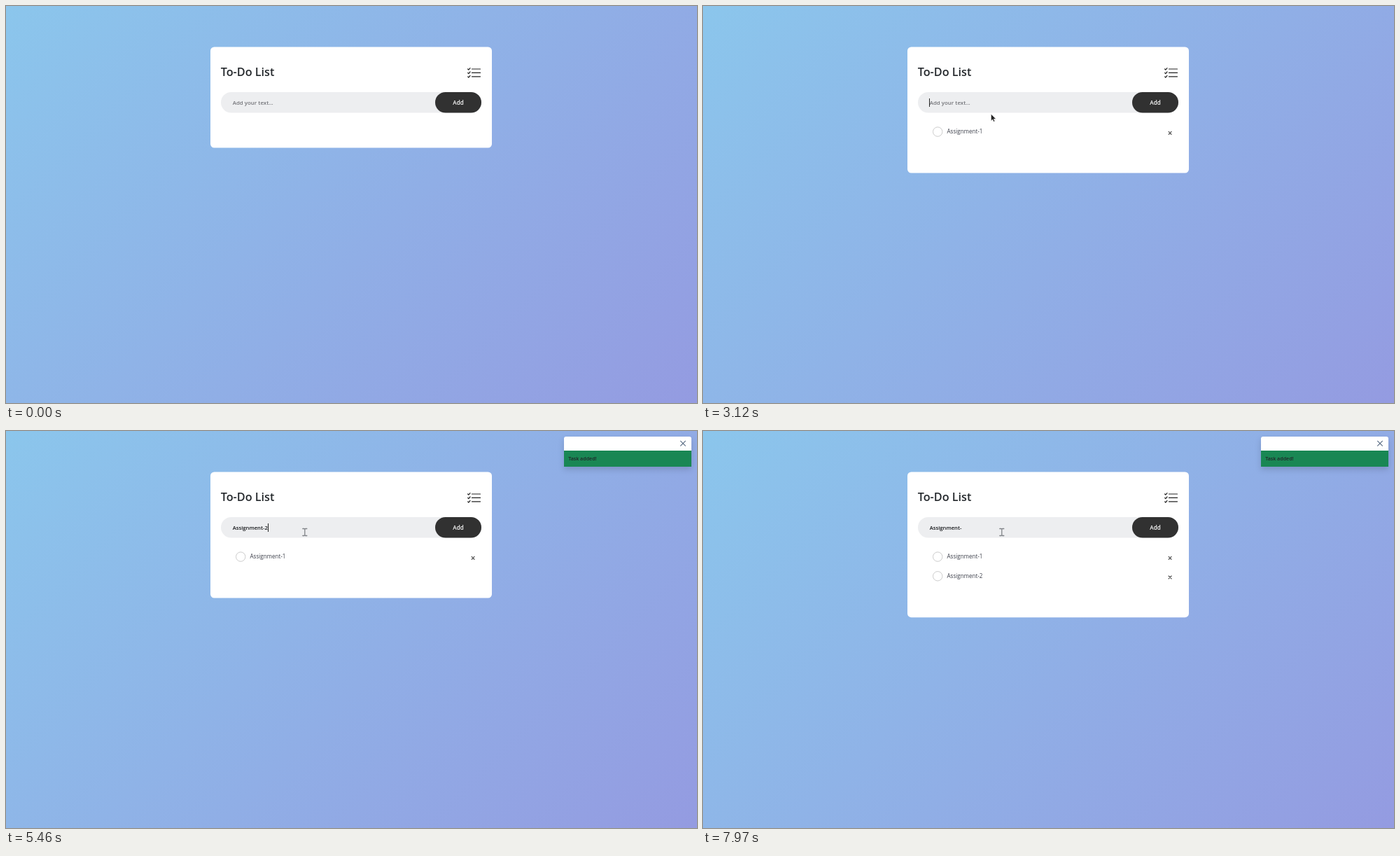
Write an HTML page that moves like this. It is 987 px wide and 567 px high and loops after 8000 ms.

```html
<!DOCTYPE html>
<html lang="en">
<head>
<meta charset="utf-8">
<title>To-Do List</title>
<style>
  html, body { margin: 0; width: 100%; height: 100%; overflow: hidden; }
  body { background: linear-gradient(135deg, #8bc6ec 0%, #949be1 100%); }
  svg { display: block; font-family: "Open Sans", "Noto Sans", sans-serif; }
  .semi { font-weight: 600; }
  .line { fill: none; stroke-linecap: round; stroke-linejoin: round; }
  #toast { filter: drop-shadow(0 4px 4px rgba(0, 0, 0, .15)); }
</style>
</head>
<body>
<svg width="987" height="567" viewBox="0 0 987 567">
  <defs>
    <g id="row">
      <circle cx="335.2" cy="179.6" r="6.7" fill="#fff" stroke="#ccc"/>
      <path class="line" d="M665.1 179.3l4 4m0-4l-4 4" stroke="#444" stroke-width="1.1"/>
    </g>
    <path id="check" class="line" d="M665.5 90h12M659.6 90l1.2 1.2 2.2-2.6" stroke="#222" stroke-width="1.2"/>
  </defs>

  <rect id="card" x="292" y="58.5" width="402" rx="5.5" fill="#fff"/>
  <text class="semi" x="306.7" y="99.7" font-size="16.2" fill="#24282c">To-Do List</text>
  <use href="#check"/>
  <use href="#check" y="5.4"/>
  <use href="#check" y="10.8"/>
  <rect x="307" y="123" width="372" height="29.6" rx="14.8" fill="#edeef0"/>
  <rect x="613" y="123" width="66" height="29.6" rx="14.8" fill="#313131"/>
  <text class="semi" x="646" y="141" font-size="8.1" fill="#fff" text-anchor="middle">Add</text>
  <text class="semi" id="hint" x="323.7" y="141" font-size="7.9" fill="#74757a">Add your text...</text>
  <text class="semi" id="value" x="323.7" y="141" font-size="7.65" fill="#15171a"></text>
  <rect id="caret" y="132" width="1" height="12" fill="#222"/>

  <g id="rows" fill="#3c3f4a" font-size="8.03"></g>

  <g id="toast">
    <path d="M797 28V11q0-3 3-3h176q3 0 3 3v17z" fill="#fff"/>
    <path d="M797 28h182v23H797z" fill="#198754"/>
    <path class="line" d="M963.6 14.3l6.8 6.8m0-6.8l-6.8 6.8" stroke="#5f7188" stroke-width="1.2"/>
    <text class="semi" x="803.2" y="42" font-size="7.1" fill="#212529">Task added!</text>
  </g>

  <path id="arrow" d="M0 0V9.4L2.2 7.4 3.7 10.8 5.2 10.1 3.8 6.8H6.8Z" fill="#222" stroke="#fff" stroke-width=".4"/>
  <path id="beam" class="line" d="M-3 -5h2.2L0 -4.5.8 -5H3M0 -4.5V4.5M-3 5h2.2L0 4.5.8 5H3" stroke="#808388" stroke-width="1.3"/>
</svg>
<script>
const LOOP = 8000, BLINK = 530, ROW = 27.7;
const FOCUS = 1470;          // click into the input
const ERASE = 680, RETYPE = 890; // delays after a suggestion is filled in

const tasks = [
  { fill: 2000, submit: 3060 },
  { fill: 4570, submit: 5820 },
  { fill: 7290, submit: LOOP }
];
const moves = [
  { from: 90, to: 870, x: 406, y: 167 },
  { from: 970, to: 1170, x: 344, y: 158 },
  { from: 1170, to: 1700, x: 361, y: 139 },
  { from: 2250, to: 2540, x: 411.5, y: 154.5 },
  { from: 4150, to: 4670, x: 426.8, y: 144.5 }
];

const ui = {};
document.querySelectorAll("svg [id]").forEach(el => ui[el.id] = el);
ui.rows.innerHTML = tasks.slice(0, -1).map((task, i) =>
  `<g transform="translate(0 ${i * ROW})"><use href="#row"/><text x="348.5" y="182">Assignment-${i + 1}</text></g>`
).join("");

const clamp = v => Math.min(1, Math.max(0, v));
const easeOut = k => 1 - (1 - k) ** 2;
const show = (el, on) => el.setAttribute("visibility", on ? "visible" : "hidden");

function pointerAt(t) {
  let x = 936, y = 560;
  for (const move of moves) {
    const k = easeOut(clamp((t - move.from) / (move.to - move.from)));
    x += (move.x - x) * k;
    y += (move.y - y) * k;
  }
  return [x, y];
}

// The suggestion always ends in 1; later tasks swap that digit for their own.
function valueAt(t) {
  const i = tasks.findIndex(task => t >= task.fill && t < task.submit);
  if (i < 0) return "";
  const age = t - tasks[i].fill;
  const digit = i === 0 || age < ERASE ? 1 : age < RETYPE ? "" : i + 1;
  return "Assignment-" + digit;
}

// The blink restarts with every input.
function caretAt(t) {
  const inputs = [FOCUS];
  tasks.forEach((task, i) => {
    inputs.push(task.fill, task.submit);
    if (i) inputs.push(task.fill + RETYPE);
  });
  const last = Math.max(...inputs.filter(time => time <= t));
  return t >= FOCUS && Math.floor((t - last) / BLINK) % 2 === 0;
}

// First a plain fade in, then a dip when the second task replaces the message.
const toastAt = t => t < tasks[1].submit
  ? clamp((t - 3300) / 150)
  : clamp(Math.abs(t - 5995) / 160);

function draw(t) {
  const text = valueAt(t);
  ui.value.textContent = text;
  show(ui.hint, !text);
  ui.caret.setAttribute("x", text ? 323.9 + ui.value.getComputedTextLength() : 323);
  show(ui.caret, caretAt(t));

  const count = tasks.filter(task => t >= task.submit).length;
  ui.card.setAttribute("height", 144 + count * ROW + (count ? 8.3 : 0));
  [...ui.rows.children].forEach((row, i) => show(row, i < count));
  ui.toast.style.opacity = toastAt(t);

  const [x, y] = pointerAt(t);
  const overInput = y < 152.6;
  for (const el of [ui.arrow, ui.beam]) el.setAttribute("transform", `translate(${x} ${y})`);
  show(ui.arrow, t >= moves[0].from && !overInput);
  show(ui.beam, overInput);
}

function tick() {
  draw(performance.now() % LOOP);
  requestAnimationFrame(tick);
}
tick();
</script>
</body>
</html>
```
